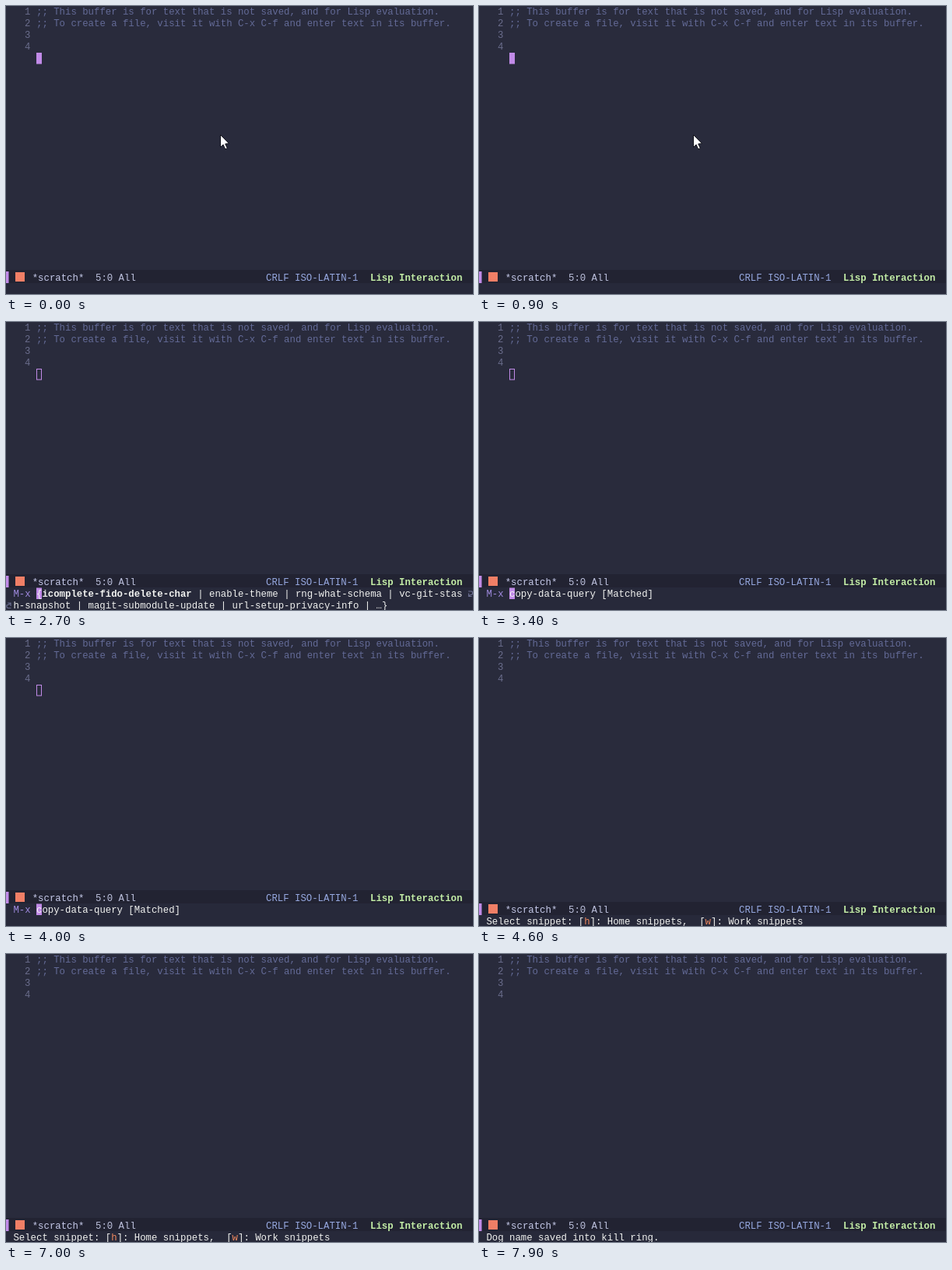
An HTML page with a canvas that plays this animation: 600 px wide and 370 px high, repeating every 8 s.

```html
<!DOCTYPE html>
<html lang="en">
<head>
<meta charset="utf-8">
<title>Scratch buffer</title>
<style>
  html, body { margin: 0; width: 100%; height: 100%; overflow: hidden; background: #292b3c; }
  canvas { display: block; width: 600px; height: 370px; }
</style>
</head>
<body>
<canvas id="stage" width="600" height="370"></canvas>
<script>
const ctx = document.getElementById('stage').getContext('2d');
const LOOP = 8000, CELL = 7.4, LEFT = 39, EDGE = 9.4;
const FONT = '12.33px "Courier New", "Liberation Mono", monospace';
const C = {
  bg: '#292b3c', bar: '#222332', echo: '#27293a', accent: '#c18be8',
  comment: '#636a96', number: '#6a6d8c', name: '#c6caea', info: '#bcc0dc',
  coding: '#96a8e0', mode: '#c3eda6', icon: '#f07f66', prompt: '#a08be0',
  text: '#f1f2f0', key: '#f0895f', fringe: '#6b6f92'
};

// Moments of change, in ms
const POINTER_GONE = 1000, PROMPT = 2300, MATCH = 3000, MENU = 4050, SAVED = 7600;

function rect(x, y, w, h, color) {
  ctx.fillStyle = color;
  ctx.fillRect(x, y, w, h);
}

function text(str, x, y, color, bold) {
  ctx.font = (bold ? 'bold ' : '') + FONT;
  ctx.fillStyle = color;
  ctx.fillText(str, x, y);
}

// Draws [string, color, bold] runs one after another
function runs(list, x, y) {
  for (const [str, color, bold] of list) {
    text(str, x, y, color, bold);
    x += str.length * CELL;
  }
}

const blink = ms => Math.floor(ms / 500) % 2 === 0;

function drawBuffer(cursor) {
  const lines = [
    ';; This buffer is for text that is not saved, and for Lisp evaluation.',
    ';; To create a file, visit it with C-x C-f and enter text in its buffer.',
    '', ''
  ];
  lines.forEach((line, i) => {
    const y = 11 + i * 15;
    text(String(i + 1), 24, y, C.number);
    text(line, LEFT, y, C.comment);
  });
  if (cursor === 'solid') rect(LEFT, 60, 7, 14.5, C.accent);
  if (cursor === 'hollow') {
    ctx.strokeStyle = C.accent;
    ctx.lineWidth = 1;
    ctx.strokeRect(LEFT + 0.5, 60.5, 6, 13.5);
  }
}

function drawModeline(top) {
  const y = top + 13.5;
  rect(0, top, 600, 17, C.bar);
  rect(0, top + 17, 600, 370 - top - 17, C.echo);
  rect(0, top + 2, 3.5, 15, C.accent);
  rect(12, top + 3, 12, 12, C.icon);
  text('*scratch*', 33.7, y, C.name);
  text('5:0 All', 115, y, C.info);
  text('CRLF ISO-LATIN-1', 334, y, C.coding);
  text('Lisp Interaction', 468, y, C.mode, true);
}

function wrapMark(x, y, dir) {
  ctx.save();
  ctx.translate(x, y);
  ctx.scale(dir, dir);
  ctx.strokeStyle = C.fringe;
  ctx.lineWidth = 1.2;
  ctx.beginPath();
  ctx.moveTo(-3, -3.5);
  ctx.lineTo(1, -3.5);
  ctx.quadraticCurveTo(3, -3, 2.5, 0);
  ctx.lineTo(-2, 2);
  ctx.moveTo(-2.5, -1);
  ctx.lineTo(-2.5, 3);
  ctx.lineTo(1.5, 3);
  ctx.stroke();
  ctx.restore();
}

function drawPrompt(t) {
  const since = t < MATCH ? t - PROMPT : t - MATCH;
  if (blink(since)) rect(LEFT, 341.5, 7, 14.5, C.accent);
  text('M-x', EDGE, 353, C.prompt);
  if (t >= MATCH) {
    text('copy-data-query [Matched]', LEFT, 353, C.text);
    return;
  }
  runs([
    ['{', C.text],
    ['icomplete-fido-delete-char', C.text, true],
    [' | enable-theme | rng-what-schema | vc-git-stas', C.text]
  ], LEFT, 353);
  text('h-snapshot | magit-submodule-update | url-setup-privacy-info | …}', EDGE, 367.5, C.text);
  wrapMark(597, 349.5, 1);
  wrapMark(3.5, 364, -1);
}

function drawMenu() {
  runs([
    ['Select snippet: [', C.text], ['h', C.key],
    [']: Home snippets,  [', C.text], ['w', C.key],
    [']: Work snippets', C.text]
  ], EDGE, 367.5);
}

function drawPointer(x, y) {
  const pts = [[0, 0], [0, 16], [3.6, 12.6], [6.2, 18.4], [8.8, 17.2], [6.2, 11.6], [11, 11.2]];
  ctx.beginPath();
  pts.forEach(([dx, dy]) => ctx.lineTo(x + dx, y + dy));
  ctx.closePath();
  ctx.fillStyle = '#fff';
  ctx.fill();
  ctx.strokeStyle = '#11121a';
  ctx.lineWidth = 1;
  ctx.stroke();
}

function draw(t) {
  const prompting = t >= PROMPT && t < MENU;
  const on = t < PROMPT ? blink(t + 300) : blink(t - MENU);
  rect(0, 0, 600, 370, C.bg);
  drawBuffer(prompting ? 'hollow' : on ? 'solid' : 'none');
  drawModeline(prompting ? 324 : 339);
  if (prompting) drawPrompt(t);
  else if (t >= SAVED) text('Dog name saved into kill ring.', EDGE, 367.5, C.text);
  else if (t >= MENU) drawMenu();
  if (t < POINTER_GONE) drawPointer(275.5, 165.5);
}

const start = performance.now();
function tick() {
  draw((performance.now() - start) % LOOP);
  requestAnimationFrame(tick);
}
tick();
</script>
</body>
</html>
```
